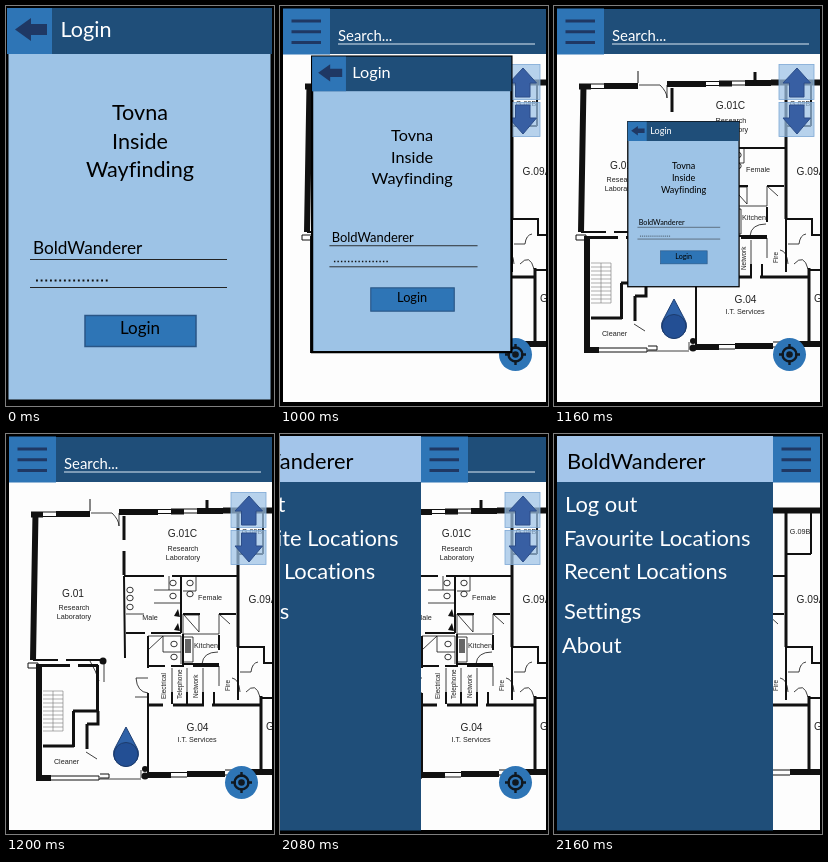
Recreate the animation shown at these times as an HTML page. Size 268 by 400 pixels, loop 3.44 s.

```html
<!DOCTYPE html>
<html lang="en">
<head>
<meta charset="utf-8">
<title>Indoor map app</title>
<style>
  html, body { margin: 0; width: 100%; height: 100%; overflow: hidden; background: #000; }
  svg { display: block; width: 100vw; height: 100vh; }
  text { font-family: Lato, "Open Sans", sans-serif; font-variant-ligatures: none; }
  .plan text { font-family: "Liberation Sans", Arial, sans-serif; font-size: 7.2px; fill: #222; text-anchor: middle; }
  .plan .room { font-size: 10.2px; }
  .plan .side { font-size: 6.4px; text-anchor: start; }
  .plan path { fill: none; stroke: #111; }
  .mid { text-anchor: middle; }
</style>
</head>
<body>
<svg viewBox="0 0 268 400" preserveAspectRatio="none">
  <defs>
    <clipPath id="screen"><rect x="3" y="3" width="263" height="393"/></clipPath>
  </defs>
  <rect width="268" height="400"/>

  <g clip-path="url(#screen)">
    <rect x="3" y="3" width="263" height="393" fill="#fdfdfd"/>
    <g class="plan">
      <!-- outer walls -->
      <path stroke-width="6" d="M25 80.500H37M50 80H84M113 78H152M165 77.500H178M191 77H217M217 76.500H268M29.500 79L27 226M33 230V346M30 344H45M142 341H165M181 340H219M236 338H268"/>
      <path stroke-width="1" d="M37 78H50M37 82.500H50M152 75.500H165M152 79.500H165M178 75H191M178 79H191M45 342H93V346H45M165 338.500H181M165 343H181M219 336H236M219 341H236M22 229H32V234H22ZM94 340H103V344H94M84 65V77"/>
      <!-- thick inner walls -->
      <path stroke-width="3" d="M33 231.500H64M72 231.500H92M91.500 231V277M67 277H92M67.500 277V313M37 312H68M81 290H92V277M81 290V315M142 271H157M167 271H198M206 271H254M255 262V340M232 77V213M118 82V106M118 117V141M201 66V77"/>
      <path stroke-width="2" d="M27 226H52M60 226H100M118 142L119 224M118 142H158M166 142H231M120 199H139M145 199H175M175 142V199M177 180H194M213 180H230M142 202V234M142 270V341M177 200V230H213M213 201V216M142 232H159M165 232H178M187 232H213M232 213H258V229H268M257 79V120M232 120H257M232 213V266M142 259V270M166 258V270M181 258V270M197 258V270M208 258V270M254 264H268"/>
      <!-- fittings and doors -->
      <path stroke-width=".8" d="M85 79H106Q113 86 113 92V79M84 227Q90 237 93 247M98 227V248M129 263H142M142 244H130Q131 258 142 259M166 234V258M181 234V258M197 234V258M213 232V252M226 244Q233 245 234 258M234 238H245Q246 229 252 228M240 258Q250 247 254 263M80 318L91 325M120 180H138M148 156H175M148 169H175M163 142V156M177 157H190M190 142V157M177 180V200H213V180M178 181H193V198L178 181M213 180L224 190M142 202H175V230M142 216L157 202M157 202V218H175M178 203H187V228H178M196 230Q197 218 212 218M135 344V336M93 345H135"/>
      <path id="stairs" style="stroke: #777" stroke-width=".6"/>
      <g id="basins" fill="#fff" stroke="#222" stroke-width=".9"></g>
      <g fill="#111">
        <circle cx="97" cy="227" r="3.500"/><circle cx="139" cy="335" r="3"/><circle cx="139" cy="342" r="3.500"/>
        <polygon points="168,182 172,175 174,183"/><polygon points="168,196 172,189 174,197"/>
        <rect x="179" y="205" width="6" height="14" fill="#666"/>
      </g>
      <g id="labels"></g>
    </g>

    <g id="controls">
      <g fill="#9dc3e6" fill-opacity=".72" stroke="#7da8d5" stroke-width=".8">
        <rect x="225" y="58.500" width="35" height="35"/><rect x="225" y="96.500" width="35" height="34"/>
      </g>
      <g fill="#385fa3" stroke="#2c4d88" stroke-width="1">
        <path d="M243 62L256.500 77H250V91H235.500V77H229Z"/>
        <path d="M243 128L256.500 112H250V99H235.500V112H229Z"/>
      </g>
      <circle cx="235.500" cy="348.500" r="16.500" fill="#2e75b6"/>
      <g fill="none" stroke="#101820" stroke-width="2.400">
        <circle cx="235.500" cy="348.500" r="7"/>
        <path d="M235.500 338V343M235.500 354V359M225 348.500H230M241 348.500H246"/>
        <circle cx="235.500" cy="348.500" r="3.300" fill="#101820" stroke="none"/>
      </g>
      <path d="M120 293L130.500 313A12.500 12.500 0 1 1 109.500 313Z" fill="#2f62a8" stroke="#1f3f73"/>
      <circle cx="120" cy="320.500" r="12" fill="#234f94" stroke="#1c3b6c"/>
    </g>

    <rect x="3" y="3" width="263" height="45" fill="#1f4e79"/>
    <text x="58" y="34.700" font-size="14.900" fill="#fff">Search...</text>
    <path d="M58 38H255" stroke="#dce8f4" stroke-width="1.200"/>
  </g>

  <g id="menu">
    <g id="drawer">
      <rect x="3" y="2" width="216" height="394.500" fill="#1f4e79"/>
      <rect x="3" y="2" width="216" height="46" fill="#a3c5ea"/>
      <text x="13" y="34.500" font-size="21.800">BoldWanderer</text>
      <g id="items" font-size="21.900" fill="#fff"></g>
    </g>
    <rect x="219" y="2.500" width="47" height="46" fill="#2e75b6"/>
    <path d="M227.500 15H257M227.500 25.700H257M227.500 36.400H257" stroke="#1f3864" stroke-width="3"/>
  </g>

  <g id="login">
    <rect x="1" y="2" width="265" height="393" fill="#9dc3e6" stroke="#000" stroke-width="3"/>
    <rect x="1" y="2" width="265" height="46" fill="#1f4e79"/>
    <rect x="1" y="2" width="45" height="46" fill="#2e75b6"/>
    <path d="M9 23.500L25 12V18H41V29H25V35Z" fill="#1f3864"/>
    <text x="54.500" y="31" font-size="21.600" fill="#fff">Login</text>
    <g class="mid" font-size="21.600">
      <text x="134" y="114">Tovna</text>
      <text x="134" y="143">Inside</text>
      <text x="134" y="171">Wayfinding</text>
    </g>
    <text x="27" y="248" font-size="17.200">BoldWanderer</text>
    <path d="M24 253.500H221M24 281.500H221" stroke="#222" stroke-width="1.200"/>
    <path d="M30 274.500H102" stroke="#111" stroke-width="1.900" stroke-dasharray="1.900 2.750"/>
    <rect x="79" y="309.500" width="111" height="31" fill="#2e75b6" stroke="#2a5686" stroke-width="1.500"/>
    <text class="mid" x="134" y="328" font-size="17">Login</text>
  </g>
</svg>
<script>
const $ = id => document.getElementById(id);
const LOOP = 3440;

const label = (x, y, words, cls = "") => `<text x="${x}" y="${y}" class="${cls}">${words}</text>`;
const upright = (x, y, words) => `<text class="side" transform="translate(${x} ${y}) rotate(-90)">${words}</text>`;

$("labels").innerHTML = [
  label(67, 163, "G.01", "room"), label(68, 176, "Research"), label(68, 185, "Laboratory"),
  label(176.5, 102.5, "G.01C", "room"), label(177, 117, "Research"), label(177, 126, "Laboratory"),
  label(144, 186, "Male"), label(204, 166, "Female"), label(200, 213.5, "Kitchen"),
  label(191.5, 297, "G.04", "room"), label(191, 307.5, "I.T. Services"),
  label(60.5, 330, "Cleaner"), label(257, 169, "G.09A", "room"),
  label(246, 100, "G.09B"), label(264, 296, "G", "room"),
  upright(160, 265, "Electrical"), upright(176, 265, "Telephone"),
  upright(192, 264, "Network"), upright(224, 257, "Fire")
].join("");

$("items").innerHTML = [
  [11, 78, "Log out"], [10, 112, "Favourite Locations"], [10, 145, "Recent Locations"],
  [10, 185, "Settings"], [8, 219, "About"]
].map(item => label(...item)).join("");

$("basins").innerHTML = [
  [124, 156], [124, 164], [124, 173], [167, 149], [167, 162], [184, 149], [184, 160], [168, 210], [168, 223]
].map(([x, y]) => `<ellipse cx="${x}" cy="${y}" rx="3.2" ry="2.8"/>`).join("");

let stairs = "M37 257H57V297H37M47 257V297";
for (let y = 261; y < 297; y += 4) stairs += `M37 ${y}H57`;
$("stairs").setAttribute("d", stairs);

// Each entry: [start time, value], held until the next one.
const loginScale = [[0, 1], [1000, 0.752], [1080, 0.586], [1160, 0.42], [1200, 0]];
const menuShift = [[0, 0], [2000, 48], [2080, 138], [2160, 216]];
const held = (track, t) => track.filter(([start]) => start <= t).pop()[1];
const show = (node, on) => node.setAttribute("visibility", on ? "visible" : "hidden");

function draw(t) {
  const scale = held(loginScale, t);
  const shift = held(menuShift, t);
  $("login").setAttribute("transform", `translate(${126.5 * (1 - scale)} ${198 * (1 - scale)}) scale(${scale})`);
  show($("login"), scale > 0);
  $("menu").setAttribute("transform", `translate(${shift - 216} 0)`);
  show($("drawer"), shift > 0);
  show($("controls"), shift < 216);
}

const begin = performance.now();
function tick() {
  draw((performance.now() - begin) % LOOP);
  requestAnimationFrame(tick);
}
tick();
</script>
</body>
</html>
```
